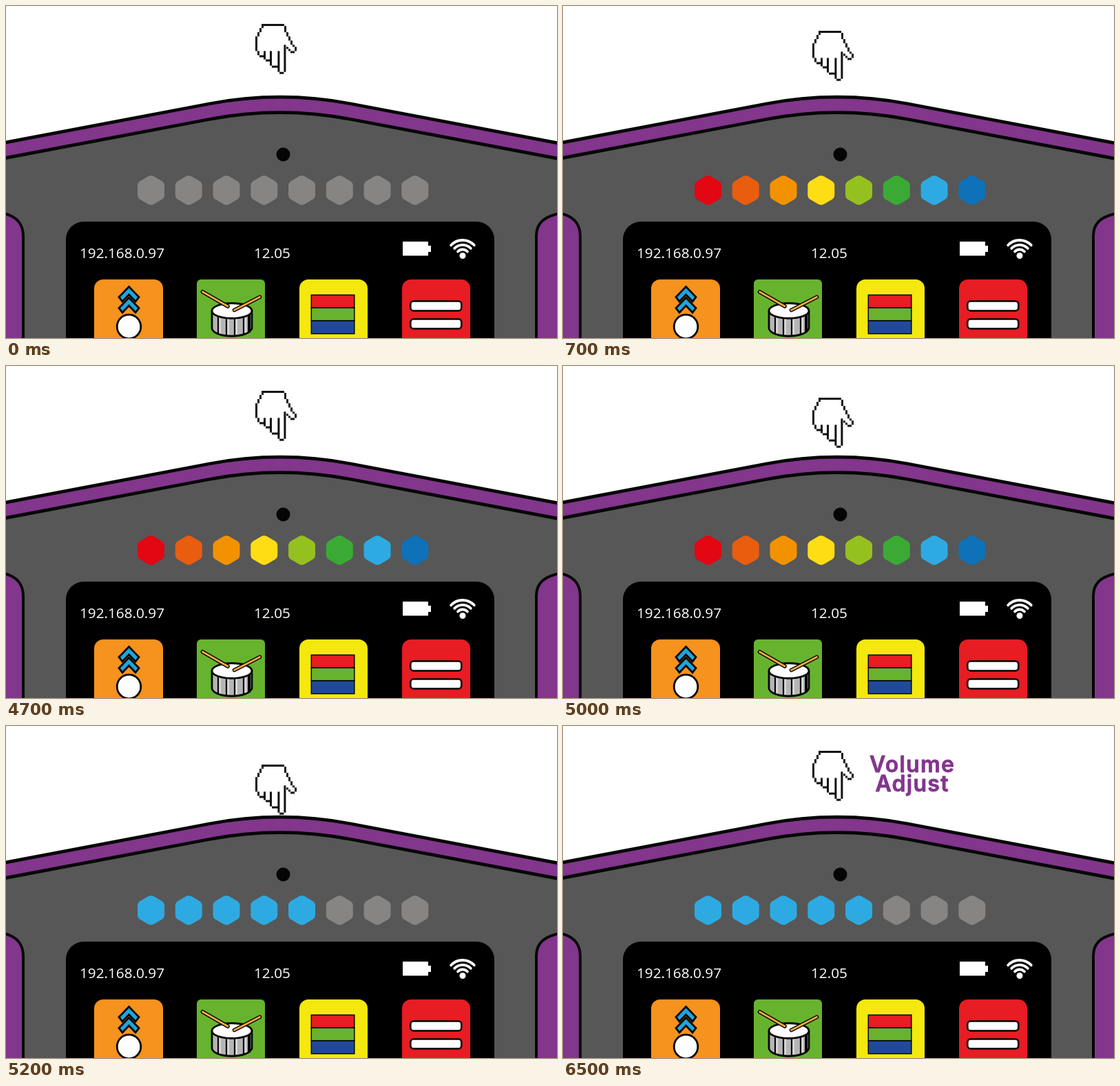
Write an HTML page with a canvas that moves like this. It is 800 px wide and 482 px high and loops after 8000 ms.

```html
<!DOCTYPE html>
<html lang="en">
<head>
<meta charset="utf-8">
<title>Touch lights</title>
<style>
  html, body { margin: 0; width: 100%; height: 100%; overflow: hidden; background: #fff; }
  canvas { display: block; width: 800px; height: 482px; }
</style>
</head>
<body>
<canvas id="stage" width="800" height="482"></canvas>
<script>
const ctx = document.getElementById('stage').getContext('2d');
const LOOP = 8000;
const PURPLE = '#82368c', BLACK = '#050505', GREY = '#868583', BLUE = '#2eaae2';
const RAINBOW = ['#e30613', '#e95d0f', '#f39200', '#ffdd15', '#95c11f', '#3aaa35', BLUE, '#0f71b8'];

// Hand outline as blocks of 3 px: column, row, width, height
const HAND = [
  [3, 0, 11, 1], [3, 1, 1, 1], [2, 2, 1, 2], [1, 4, 1, 2], [0, 6, 1, 7],
  [1, 13, 1, 2], [2, 15, 2, 1], [4, 13, 1, 4], [5, 17, 2, 1], [7, 13, 1, 7],
  [8, 20, 3, 1], [10.8, 13, 1, 10], [11.7, 23, 2.1, 1], [13.8, 10, 1, 13],
  [14, 1, 1, 3], [15, 4, 1, 2], [16, 6, 1, 2], [17, 8, 1, 2], [18, 10, 1, 1],
  [19, 11, 1, 2], [17, 13, 2, 1], [16, 12, 1, 1], [15, 11, 1, 1]
];

// [start time, value] pairs; a value holds until the next one
const HAND_Y = [[0, 26], [100, 36], [200, 46], [300, 56], [600, 46], [700, 36],
  [5000, 46], [5100, 56], [5400, 46], [5500, 36]];
const LIGHTS = [[0, 'off'], [600, 'battery'], [5200, 'volume']];
const LABELS = [
  [0, null],
  [1700, { words: ['Battery', 'Indicator'], x: 521.5, y: 71 }],
  [4700, null],
  [6500, { words: ['Volume', 'Adjust'], x: 506.5, y: 67 }]
];

function at(track, t) {
  let value = track[0][1];
  for (const [start, v] of track) if (t >= start) value = v;
  return value;
}

function paint(path, fill, stroke, width) {
  if (fill) { ctx.fillStyle = fill; ctx.fill(path); }
  if (stroke) { ctx.strokeStyle = stroke; ctx.lineWidth = width; ctx.stroke(path); }
}

function box(x, y, w, h, r, fill, stroke, width) {
  const p = new Path2D();
  p.roundRect(x, y, w, h, r);
  paint(p, fill, stroke, width);
}

function disc(x, y, rx, ry, fill, stroke, width) {
  const p = new Path2D();
  p.ellipse(x, y, rx, ry, 0, 0, Math.PI * 2);
  paint(p, fill, stroke, width);
}

function line(x1, y1, x2, y2, color, width) {
  paint(new Path2D(`M${x1} ${y1}L${x2} ${y2}`), null, color, width);
}

function shell(edge, fill) {
  const p = new Path2D(`M-20 ${edge + 3.8}L295 ${edge - 56}Q398 ${edge - 75.6} 501 ${edge - 56}
    L820 ${edge + 4.6}V500H-20Z`);
  paint(p, fill, BLACK, 4.8);
}

function hexagon(cx, cy, color) {
  const R = 22.5, point = i => {
    const a = (i * 60 - 90) * Math.PI / 180;
    return [cx + R * Math.cos(a), cy + R * Math.sin(a)];
  };
  const p = new Path2D();
  p.moveTo(cx + 19.5, cy);
  for (let i = 2; i < 8; i++) p.arcTo(...point(i), ...point(i + 1), 8);
  p.closePath();
  paint(p, color);
}

function device() {
  shell(198, PURPLE);
  shell(220.5, '#575757');
  paint(new Path2D('M-10 299L0 302C17 307 25 317 25 335V490H-10Z'), PURPLE, BLACK, 4);
  paint(new Path2D('M810 298L800 302C780 307 770 316 770 334V490H810Z'), PURPLE, BLACK, 4);
  disc(402.5, 215.5, 10, 10, BLACK);
  box(87, 313, 622, 200, 26, '#000');
}

function statusBar() {
  ctx.fillStyle = '#fff';
  ctx.font = '20.7px "Open Sans", sans-serif';
  ctx.textAlign = 'left';
  ctx.letterSpacing = '0px';
  ctx.fillText('192.168.0.97', 107, 366);
  ctx.fillText('12.05', 360, 366);
  ctx.fillRect(576, 342, 37, 20.5);
  ctx.fillRect(613, 348, 4, 9);
  disc(663, 362.5, 4.5, 4.5, '#fff');
  ctx.lineCap = 'round';
  for (const r of [9.5, 16.2, 23]) {
    const p = new Path2D();
    p.arc(663, 363, r, -Math.PI * 0.76, -Math.PI * 0.24);
    paint(p, null, '#fff', 3.8);
  }
  ctx.lineCap = 'butt';
}

function arrowTile() {
  box(128, 397, 100, 110, 13, '#f6921e');
  for (const y of [407.5, 423.5]) {
    paint(new Path2D(`M178.5 ${y}l14.5 15-5 6.5-9.5-10-9.5 10-5-6.5Z`), '#1ea5dd', BLACK, 2.8);
  }
  disc(178.5, 465.5, 17.3, 17.3, '#fff', BLACK, 2.8);
}

function stick(x1, y1, x2, y2) {
  ctx.lineCap = 'round';
  line(x1, y1, x2, y2, BLACK, 5.6);
  line(x1, y1, x2, y2, '#f2a944', 2.8);
  ctx.lineCap = 'butt';
}

function drumTile() {
  box(277, 397, 99, 110, 6, '#67b32e');
  const body = new Path2D('M299 443V468C302 483 353 483 357 468V443Z');
  ctx.save();
  ctx.clip(body);
  ctx.fillStyle = '#b5b5b7';
  ctx.fillRect(295, 440, 66, 45);
  for (const x of [308, 320, 332, 345]) {
    ctx.fillStyle = '#d8d8d9';
    ctx.fillRect(x, 440, 4, 45);
    line(x, 440, x, 485, BLACK, 2.2);
  }
  line(353, 440, 353, 485, BLACK, 4);
  ctx.restore();
  paint(body, null, BLACK, 2.8);
  disc(328, 442.5, 29, 11, '#fff', BLACK, 2.8);
  stick(285.5, 415, 322, 436);
  stick(368.5, 422.5, 331.5, 441.5);
}

function stripeTile() {
  box(426, 397, 99, 110, 13, '#f4e80e');
  ['#e81c23', '#67b32e', '#204a99'].forEach((c, i) => {
    box(443.3, 419.5 + i * 18.8, 62.5, 18.6, 0, c, BLACK, 1.5);
  });
}

function barTile() {
  box(575, 397, 99, 110, 13, '#e81c23');
  for (const y of [428.5, 454.5]) box(587.3, y, 74, 14, 4.5, '#fff', BLACK, 2.6);
}

function lights(mode) {
  for (let i = 0; i < 8; i++) {
    let color = GREY;
    if (mode === 'battery') color = RAINBOW[i];
    else if (mode === 'volume' && i < 5) color = BLUE;
    hexagon(210.5 + i * 54.76, 267.5, color);
  }
}

function hand(y) {
  ctx.fillStyle = '#111';
  for (const [c, r, w, h] of HAND) ctx.fillRect(362 + c * 3, y + r * 3.03, w * 3, h * 3.03);
}

function label({ words, x, y }) {
  ctx.font = '600 32px Inter, sans-serif';
  ctx.letterSpacing = '1.3px';
  ctx.textAlign = 'center';
  ctx.lineJoin = 'round';
  ctx.lineWidth = 0.8;
  ctx.fillStyle = ctx.strokeStyle = PURPLE;
  words.forEach((word, i) => {
    ctx.fillText(word, x + 0.6, y + i * 28);
    ctx.strokeText(word, x + 0.6, y + i * 28);
  });
  ctx.lineJoin = 'miter';
}

function draw(t) {
  ctx.fillStyle = '#fff';
  ctx.fillRect(0, 0, 800, 482);
  device();
  statusBar();
  arrowTile();
  drumTile();
  stripeTile();
  barTile();
  lights(at(LIGHTS, t));
  hand(at(HAND_Y, t));
  const text = at(LABELS, t);
  if (text) label(text);
}

const start = performance.now();
function tick() {
  draw((performance.now() - start) % LOOP);
  requestAnimationFrame(tick);
}
tick();
</script>
</body>
</html>
```
